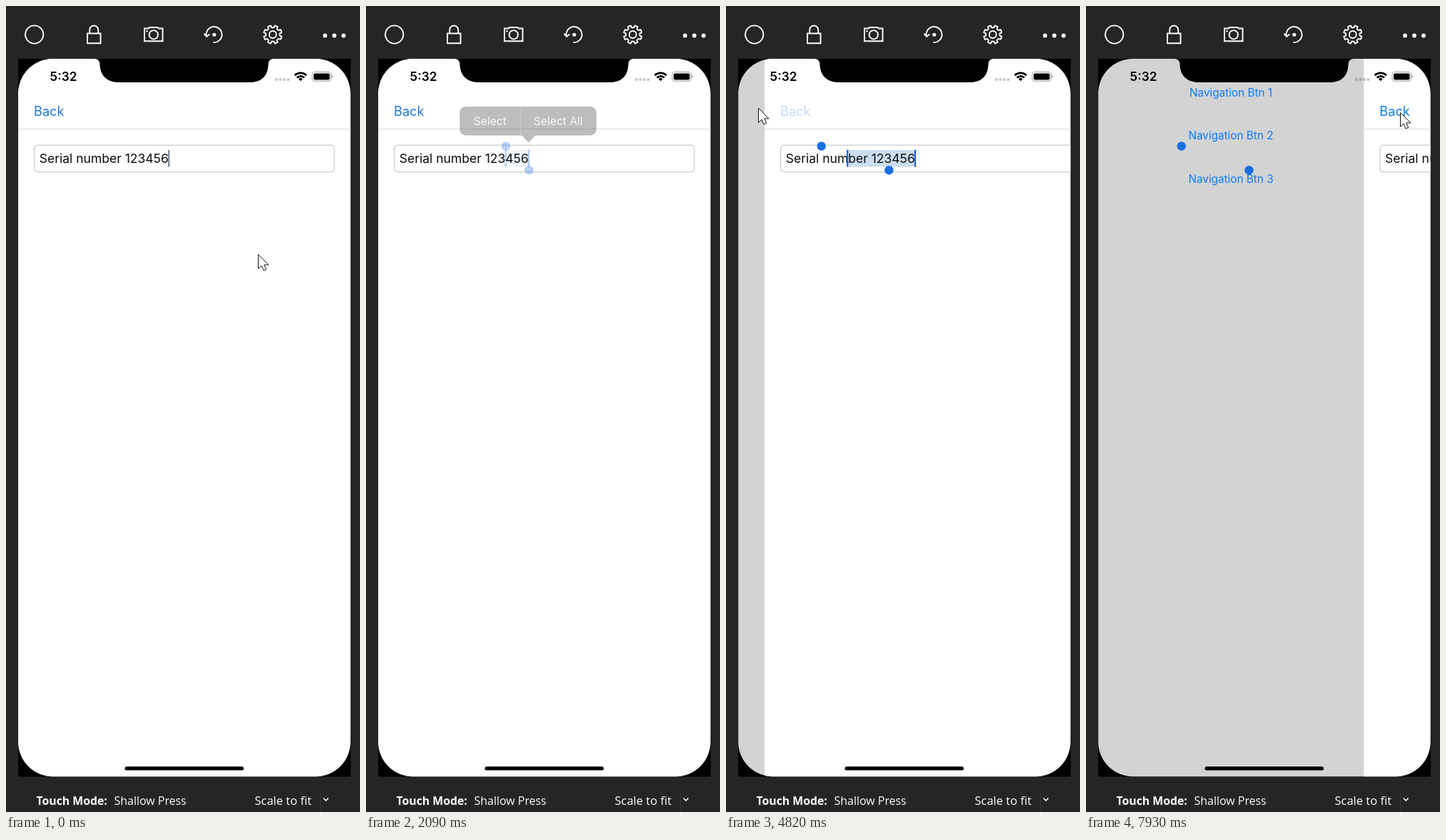
An HTML page for the animation above (8 s loop, 496x1130 px).

```html
<!DOCTYPE html>
<html lang="en">
<head>
<meta charset="utf-8">
<title>Phone simulator</title>
<style>
html, body { margin: 0; width: 100%; height: 100%; overflow: hidden; background: #252525; }
svg { display: block; width: 100vw; height: 100vh; }
text { font-family: Inter, "Liberation Sans", sans-serif; white-space: pre; }
.bar text { font-family: "Open Sans", "Noto Sans", sans-serif; fill: #fff; }
.icons { fill: none; stroke: #fff; stroke-width: 1.9; }
.icons .solid { fill: #fff; stroke: none; }
</style>
</head>
<body>
<svg viewBox="0 0 496 1130">
  <defs>
    <clipPath id="screen"><rect x="17.2" y="74" width="465.3" height="1006.3" rx="48.5"/></clipPath>
  </defs>
  <rect width="496" height="1130" fill="#252525"/>

  <g class="icons">
    <circle cx="39.7" cy="40" r="12.6"/>
    <path d="M114 38.5H132.5V52.3H114ZM117.2 38.5V33.5A6 6 0 0 1 129.2 33.5V38.5"/>
    <path d="M194 31.5H199.5L201 30H212.5L214 31.5H219.5V49.3H194Z"/>
    <circle cx="206.8" cy="40.3" r="6.2"/>
    <circle class="solid" cx="197.5" cy="35.2" r="1.2"/>
    <path d="M280.8 42.5A11 11 0 1 1 290.5 51M277.6 38.8L281 43L285.3 39.6"/>
    <circle class="solid" cx="291.8" cy="40.3" r="2.5"/>
    <path id="gear" stroke-linejoin="round"/>
    <circle cx="373.8" cy="40" r="5"/>
    <circle class="solid" cx="447" cy="41.5" r="2.9"/>
    <circle class="solid" cx="460" cy="41.5" r="2.9"/>
    <circle class="solid" cx="473" cy="41.5" r="2.9"/>
  </g>

  <rect x="17" y="74" width="466" height="1006.5"/>
  <g clip-path="url(#screen)">
    <rect x="17" y="74" width="466" height="1007" fill="#d3d3d3"/>
    <g font-size="15.3" fill="#0a7cff" text-anchor="middle">
      <text x="203" y="126.5">Navigation Btn 1</text>
      <text x="203" y="187.3">Navigation Btn 2</text>
      <text x="203" y="248">Navigation Btn 3</text>
    </g>

    <g id="page">
      <rect x="17" y="74" width="466" height="1007" fill="#fff"/>
      <path d="M17 172.5H483" stroke="#dcdcdc"/>
      <text id="back" x="39" y="154.3" font-size="18.2">Back</text>
      <rect x="39.6" y="195.2" width="420.4" height="37.5" rx="5" fill="#fff" stroke="#cbcbcb" stroke-width="1.2"/>
      <rect id="mark" y="202" height="23.5" fill="#cbddf0"/>
      <text x="46.8" y="220.2" font-size="17.5" fill="#0c0c0c">Serial number 123456</text>
      <rect id="caret" x="227" y="202" width="2.3" height="23.5"/>
      <g id="edges" fill="#1767d2">
        <rect id="edge" y="201.5" width="2.2" height="24"/>
        <rect x="227" y="201.5" width="2.2" height="24"/>
      </g>
    </g>

    <g id="knobs" fill="#176fe2">
      <circle id="knob" cy="196.5" r="6.2"/>
      <circle cx="228.4" cy="230.2" r="6.2"/>
    </g>

    <path d="M124 74Q131 74 131.5 82C132 98 142 107 158 107H342C358 107 367 98 367.5 82Q368 74 375 74Z"/>
    <text x="61.6" y="105.2" font-size="17.3" font-weight="600">5:32</text>
    <g opacity=".2">
      <circle cx="378.6" cy="103" r="2.2"/>
      <circle cx="384.4" cy="103" r="2.2"/>
      <circle cx="390.1" cy="103" r="2.2"/>
      <circle cx="395.8" cy="103" r="2.2"/>
    </g>
    <g fill="none" stroke="#000" stroke-width="2.7">
      <path d="M404.6 97.2A11.8 11.8 0 0 1 421 97.2M407.6 100.5A7.4 7.4 0 0 1 418 100.5"/>
      <path d="M412.8 105.3L409.9 102.3A4.3 4.3 0 0 1 415.7 102.3Z" fill="#000" stroke="none"/>
    </g>
    <rect x="429" y="92.5" width="26.6" height="12.8" rx="3.8" fill="none" stroke="#000" stroke-opacity=".4" stroke-width="1.1"/>
    <rect x="431" y="94.4" width="22.6" height="9" rx="2.2"/>
    <path d="M457 96.8Q459 98.9 457 101Z" opacity=".45"/>
    <rect x="166.5" y="1066.2" width="166.5" height="5.4" rx="2.7"/>

    <g id="menu">
      <path d="M217.5 181H238L227.7 191.2Z"/>
      <rect x="131.3" y="141" width="191.6" height="40.5" rx="8.5"/>
      <path d="M216.5 141V181" stroke="#3a3a3a"/>
      <g font-size="15.6" fill="#ececec">
        <text x="150.8" y="166.8">Select</text>
        <text x="235" y="166.8">Select All</text>
      </g>
    </g>
  </g>

  <g class="bar">
    <text x="42.5" y="1120" font-size="15.8" font-weight="700">Touch Mode:</text>
    <text x="151.5" y="1120" font-size="15.95">Shallow Press</text>
    <text x="348.5" y="1120" font-size="16.5">Scale to fit</text>
    <path d="M440.5 1100V1130" stroke="#343434"/>
    <path d="M444.8 1110.6L448.2 1114L451.6 1110.6" fill="none" stroke="#fff" stroke-width="1.5"/>
  </g>

  <path id="pointer" d="M.5 .3V20.3L5 16.2L8 22.9L11.7 21.3L8.7 14.9H15Z" fill="#fff" stroke="#111" stroke-width="1"/>
</svg>
<script>
const LOOP = 8000;
const $ = id => document.getElementById(id);
const el = {};
for (const id of ['page', 'back', 'mark', 'caret', 'edges', 'edge', 'knobs', 'knob', 'menu', 'pointer']) el[id] = $(id);

const set = (node, attrs) => {
  for (const key in attrs) node.setAttribute(key, attrs[key]);
};
const ramp = (t, a, b) => Math.min(1, Math.max(0, (t - a) / (b - a)));
const smooth = p => p * p * (3 - 2 * p);
const mix = (a, b, p) => a + (b - a) * p;

// time, x, y, 1 = ease into this stop
const stops = [
  [20, 353, 348], [700, 221, 193, 1], [960, 221, 193], [1260, 476, 251, 1],
  [3949, 398, 143], [4340, 45, 143, 1],
  [5840, 45, 143], [6280, 150, 222, 1], [6440, 136, 203, 1],
  [6550, 136, 203], [6700, 195, 224], [6830, 224, 233], [6999, 224, 233], [7000, 222, 233],
  [7240, 222, 233], [7480, 320, 271], [7640, 395, 245], [7800, 450, 178], [7930, 440, 149]
];

function pointerAt(t) {
  const i = stops.findIndex(s => s[0] > t);
  if (i === 0) return stops[0].slice(1, 3);
  if (i < 0) return stops[stops.length - 1].slice(1, 3);
  const a = stops[i - 1], b = stops[i];
  const p = ramp(t, a[0], b[0]);
  const q = b[3] ? smooth(p) : p;
  return [mix(a[1], b[1], q), mix(a[2], b[2], q)];
}

function caretAlpha(t) {
  if (t >= 1950) return 0;
  if (t >= 850) return 1 - ramp(t, 1430, 1640);
  return 1 - ramp(t, 90, 180) + ramp(t, 480, 600);
}

function backAlpha(t) {
  if (t < 4880) return mix(1, 0.25, ramp(t, 4480, 4780));
  return mix(0.8, 1, ramp(t, 4900, 5190));
}

function draw(t) {
  const [x, y] = pointerAt(t);
  const shown = t < 1310 || t >= 3950;
  set(el.pointer, { transform: `translate(${x} ${y})`, opacity: shown ? 1 : 0 });

  const shift = t < 4820 ? 0 : t < 4900 ? 37 : 372.3;
  set(el.page, { transform: `translate(${shift})` });
  set(el.back, { fill: t < 4820 ? '#1f78da' : '#0a7cf5', opacity: backAlpha(t) });

  set(el.caret, { fill: t < 850 ? '#808b9a' : '#4a69d2', opacity: caretAlpha(t) });
  set(el.menu, { opacity: ramp(t, 800, 980) * (1 - ramp(t, 1920, 2150)) });

  const left = mix(196, 133.7, smooth(ramp(t, 2660, 3010)));
  const picked = ramp(t, 2040, 2200);
  set(el.mark, { x: left, width: 228 - left, opacity: picked });
  set(el.edge, { x: left - 1.6 });
  set(el.knob, { cx: left });
  set(el.edges, { opacity: picked });
  set(el.knobs, { opacity: picked });
}

// teeth sit between the axes
function gearPath(cx, cy, teeth) {
  const step = Math.PI * 2 / teeth;
  const points = [];
  for (let i = 0; i < teeth; i++) {
    for (const [turn, r] of [[0.2, 9.9], [0.29, 12.9], [0.71, 12.9], [0.8, 9.9]]) {
      const a = (i + turn) * step;
      points.push((cx + r * Math.cos(a)).toFixed(2) + ' ' + (cy + r * Math.sin(a)).toFixed(2));
    }
  }
  return 'M' + points.join('L') + 'Z';
}

set($('gear'), { d: gearPath(373.8, 40, 8) });

const start = performance.now();
function tick() {
  draw((performance.now() - start) % LOOP);
  requestAnimationFrame(tick);
}
draw(0);
requestAnimationFrame(tick);
</script>
</body>
</html>
```
